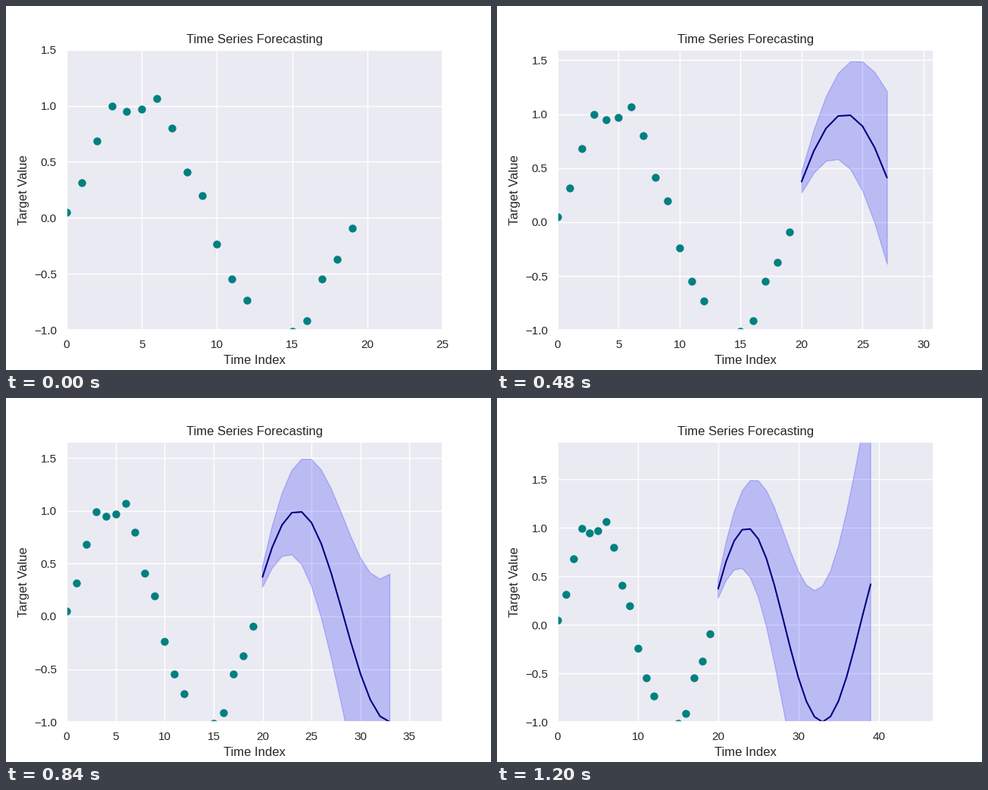
A matplotlib script for the animation above (1260 ms loop, 640 px wide and 480 px high).

```python
import matplotlib.pyplot as plt
import numpy as np
from matplotlib.animation import FuncAnimation

STEPS = 20
EASE = 0.15
INK = "0.15"

plt.rcParams.update({
    "font.family": "Liberation Sans",
    "text.color": INK,
    "axes.labelcolor": INK,
    "axes.facecolor": "#EAEAF2",
    "axes.edgecolor": "white",
    "axes.linewidth": 1.25,
    "axes.grid": True,
    "axes.axisbelow": True,
    "axes.titlesize": 12,
    "axes.labelsize": 12,
    "grid.color": "white",
    "grid.linewidth": 1,
    "grid.linestyle": "-",
    "lines.solid_capstyle": "round",
    "patch.linewidth": 1,
})
for axis in ("xtick", "ytick"):
    plt.rcParams.update({
        f"{axis}.color": INK,
        f"{axis}.labelsize": 11,
        f"{axis}.major.size": 6,
    })

# Noisy history, then a forecast whose uncertainty widens steadily
np.random.seed(42)
past_t = np.arange(20)
past = np.sin(past_t / 3) + np.random.normal(0, 0.1, 20)
future_t = np.arange(20, 20 + STEPS)
mean = np.sin(future_t / 3)
spread = 0.1 * np.arange(1, STEPS + 1)
low, high = mean - spread, mean + spread


def follow(start, targets):
    """Limits that close a fixed share of the gap to each target."""
    values = [start]
    for target in targets:
        values.append(values[-1] + EASE * (target - values[-1]))
    return values


right = follow(25, 25 + 1.5 * np.arange(1, STEPS + 1))
top = follow(1.5, np.maximum(1.5, np.maximum.accumulate(high) + 0.2))

fig, ax = plt.subplots(figsize=(6.4, 4.8), dpi=100)
ax.tick_params(bottom=False, left=False)
ax.set_title("Time Series Forecasting")
ax.set_xlabel("Time Index")
ax.set_ylabel("Target Value")
ax.scatter(past_t, past, s=36, color="teal", linewidths=1.5)
line, = ax.plot([], [], color="navy", linewidth=1.5)
bands = []


def update(n):
    while bands:
        bands.pop().remove()
    if n:
        bands.append(ax.fill_between(future_t[:n], low[:n], high[:n],
                                     color="blue", alpha=0.2))
    line.set_data(future_t[:n], mean[:n])
    ax.set_xlim(0, right[n])
    ax.set_ylim(-1, top[n])


anim = FuncAnimation(fig, update, frames=STEPS + 1, init_func=lambda: update(0),
                     interval=60, repeat=True, repeat_delay=0, blit=False)
plt.show()
```
